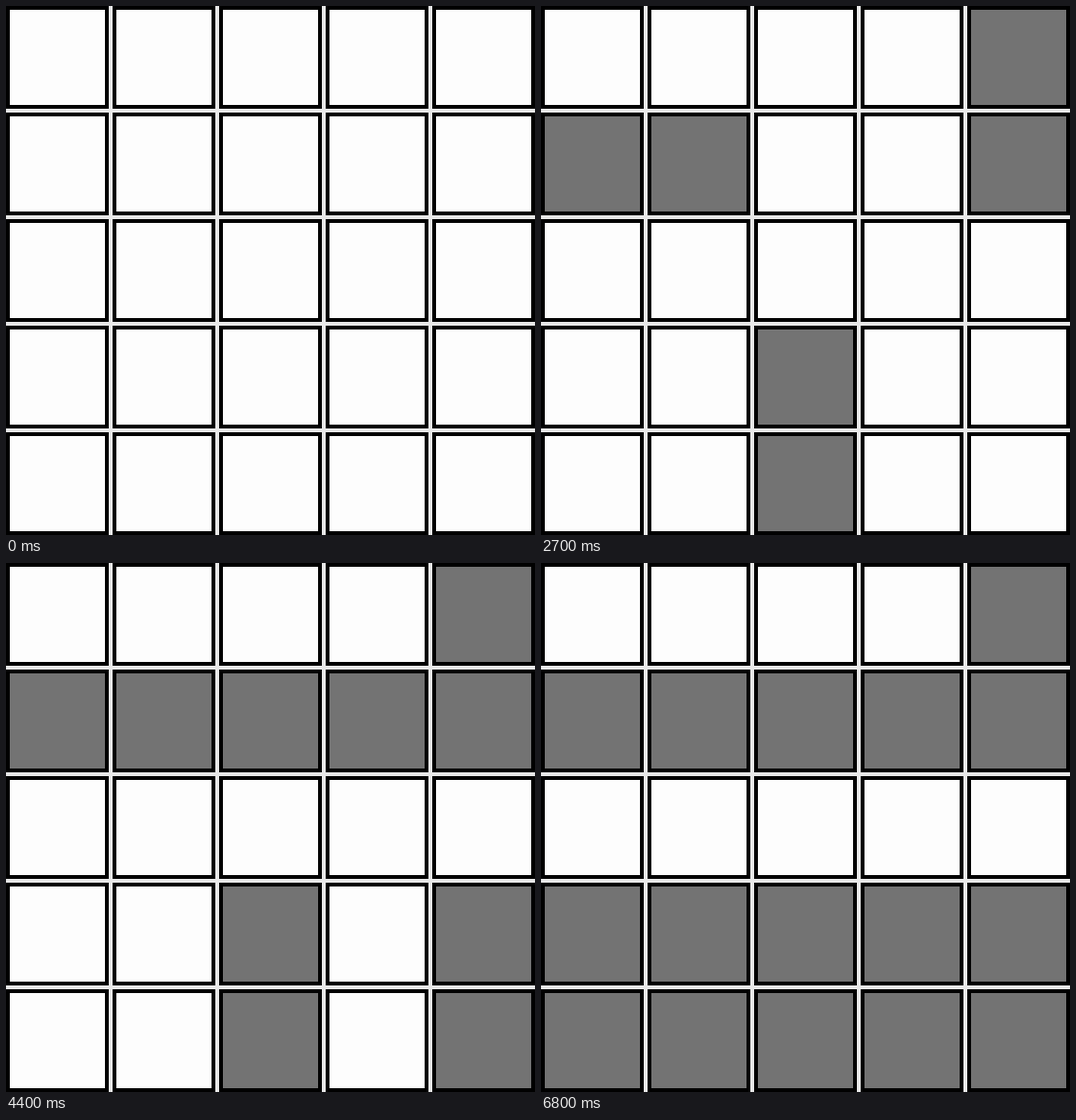
Write an HTML page with a canvas that moves like this. It is 556x556 px and loops after 8 s.

```html
<!DOCTYPE html>
<html lang="en">
<head>
<meta charset="utf-8">
<title>Domino tiling</title>
<style>
  html, body { margin: 0; width: 100%; height: 100%; overflow: hidden; }
  canvas { display: block; }
</style>
</head>
<body>
<canvas id="stage" width="556" height="556"></canvas>
<script>
const ctx = document.getElementById('stage').getContext('2d');
const LOOP = 8000, COUNT = 5, PITCH = 112, SIZE = 108, BORDER = 4;

// Start time and first cell of each domino; they stand and lie in turn
const dominoes = [
  { start: 500, col: 2, row: 3 },
  { start: 2000, col: 0, row: 1 },
  { start: 2700, col: 4, row: 0 },
  { start: 3700, col: 2, row: 1 },
  { start: 4400, col: 4, row: 3 },
  { start: 5200, col: 0, row: 3 },
  { start: 6000, col: 3, row: 3 },
  { start: 6800, col: 0, row: 4 }
];

function drawCell(col, row, fill) {
  const x = col * PITCH, y = row * PITCH, inner = SIZE - 2 * BORDER;
  ctx.fillStyle = '#000';
  ctx.fillRect(x, y, SIZE, SIZE);
  ctx.fillStyle = fill;
  ctx.fillRect(x + BORDER, y + BORDER, inner, inner);
}

function draw(time) {
  ctx.fillStyle = '#e8e8e8';
  ctx.fillRect(0, 0, 556, 556);
  for (let i = 0; i < COUNT * COUNT; i++)
    drawCell(i % COUNT, Math.floor(i / COUNT), '#fdfdfd');
  dominoes.forEach(({ start, col, row }, i) => {
    if (time < start) return;
    const lying = i % 2;
    drawCell(col, row, '#737373');
    drawCell(col + lying, row + 1 - lying, '#737373');
  });
}

const begin = performance.now();
function tick() {
  draw((performance.now() - begin) % LOOP);
  requestAnimationFrame(tick);
}
tick();
</script>
</body>
</html>
```
